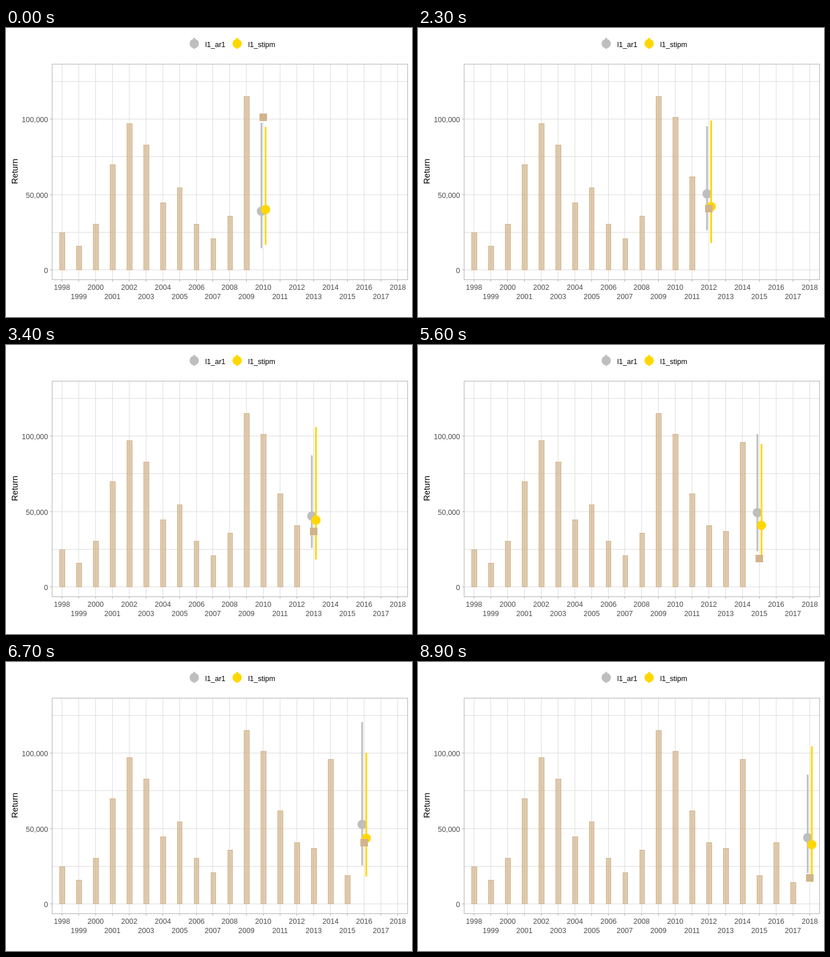
An HTML page that plays this animation: 700x500 px, repeating every 10000 ms.

```html
<!DOCTYPE html>
<html lang="en">
<head>
<meta charset="utf-8">
<title>Return forecasts by year</title>
<style>
html, body { margin: 0; width: 100%; height: 100%; overflow: hidden; background: #fff; }
svg { display: block; font: 12.5px "Liberation Sans", Arial, sans-serif; }
</style>
</head>
<body>
<svg id="chart" width="700" height="500" viewBox="0 0 700 500"></svg>
<script>
const FIRST_YEAR = 1998, FIRST_FORECAST = 2010, YEARS = 21;
const BASE = 418.5;
const TAN = '#d2b48c', GREY = '#bebebe', GOLD = '#ffd700';
const LOOP = 10000;
const CHANGES = [1100, 2300, 3400, 4500, 5600, 6700, 7800, 8900];

// Top of each year's bar, in pixels.
const TOPS = [354, 377, 339, 236, 165, 202, 302, 276, 339, 364, 325, 118,
  154, 257, 312, 322, 168, 369, 312, 381, 373];

// [upper, lower, point]; a range outside the axis has only its point.
const FORECASTS = [
  { ar: [164, 381, 317], st: [171, 375, 314] },
  { ar: [228, 228, 228], st: [98, 367, 287] },
  { ar: [170, 350, 287], st: [160, 372, 309] },
  { ar: [191, 351, 296], st: [142, 371, 303] },
  { ar: [170, 362, 295], st: [205, 380, 328] },
  { ar: [154, 357, 290], st: [171, 373, 312] },
  { ar: [104, 352, 281], st: [157, 371, 305] },
  { ar: [134, 358, 290], st: [152, 375, 312] },
  { ar: [195, 365, 304], st: [146, 381, 316] }
];

const chart = document.getElementById('chart');

function add(tag, attrs, parent = chart) {
  const el = document.createElementNS('http://www.w3.org/2000/svg', tag);
  for (const key in attrs) el.setAttribute(key, attrs[key]);
  parent.append(el);
  return el;
}

function line(x1, y1, x2, y2, stroke, width = 1, parent = chart) {
  return add('line', { x1, y1, x2, y2, stroke, 'stroke-width': width }, parent);
}

function text(x, y, label, attrs = {}) {
  add('text', { x, y, fill: '#4d4d4d', ...attrs }).textContent = label;
}

function pointRange(x, [upper, lower, point], color, parent = chart) {
  line(x, upper, x, lower, color, 3, parent);
  add('circle', { cx: x, cy: point, r: 8, fill: color }, parent);
}

const yearX = i => 96.6 + 28.93 * i;
const snap = v => Math.floor(v) + 0.5;

function drawAxes() {
  for (let i = 0; i < 6; i++) {
    const y = snap(BASE + 0.3 - 65.27 * i);
    line(80, y, 692, y, '#dedede');
    if (i % 2 === 0) {
      line(76, y, 79, y, '#b3b3b3');
      text(72.5, y + 5, (i * 25000).toLocaleString('en-US'), { 'text-anchor': 'end' });
    }
  }
  for (let i = 0; i < YEARS; i++) {
    const x = snap(yearX(i));
    line(x, 63, x, 435, '#dedede');
    line(x, 436, x, 439, '#b3b3b3');
    text(x, i % 2 ? 469 : 453, FIRST_YEAR + i, { 'text-anchor': 'middle' });
  }
  text(0, 0, 'Return', {
    transform: 'translate(20 248) rotate(-90)', 'text-anchor': 'middle',
    'font-size': 14.67, fill: '#000'
  });
}

function drawLegend() {
  [[324, GREY, 'l1_ar1'], [398, GOLD, 'l1_stipm']].forEach(([x, color, label]) => {
    pointRange(x + 0.5, [17, 36, 27], color);
    text(x + 19.5, 33, label, { fill: '#000' });
  });
}

function drawBar(top, i) {
  const left = Math.round(yearX(i) - 4.34) + 0.5;
  const right = Math.round(yearX(i) + 4.34) + 0.5;
  return add('rect', {
    x: left, y: top + 0.5, width: right - left, height: BASE - top - 0.5,
    fill: TAN, 'fill-opacity': 0.7, stroke: TAN
  });
}

function drawForecast({ ar, st }, i) {
  const index = FIRST_FORECAST - FIRST_YEAR + i;
  const x = yearX(index);
  const group = add('g', {});
  pointRange(x - 3.3, ar, GREY, group);
  pointRange(x + 3.8, st, GOLD, group);
  add('rect', {
    x: Math.round(x - 6.6), y: TOPS[index] - 6, width: 13, height: 13, fill: TAN
  }, group);
  return group;
}

drawAxes();
const bars = TOPS.map(drawBar);
const forecasts = FORECASTS.map(drawForecast);
add('rect', { x: 79.5, y: 62.5, width: 613, height: 373, fill: 'none', stroke: '#b3b3b3' });
drawLegend();

function show(el, visible) {
  el.setAttribute('visibility', visible ? 'visible' : 'hidden');
}

function render(time) {
  const step = CHANGES.filter(t => t <= time % LOOP).length;
  bars.forEach((bar, i) => show(bar, i < FIRST_FORECAST - FIRST_YEAR + step));
  forecasts.forEach((group, i) => show(group, i === step));
}

const start = performance.now();
function tick() {
  render(performance.now() - start);
  requestAnimationFrame(tick);
}
render(0);
requestAnimationFrame(tick);
</script>
</body>
</html>
```
